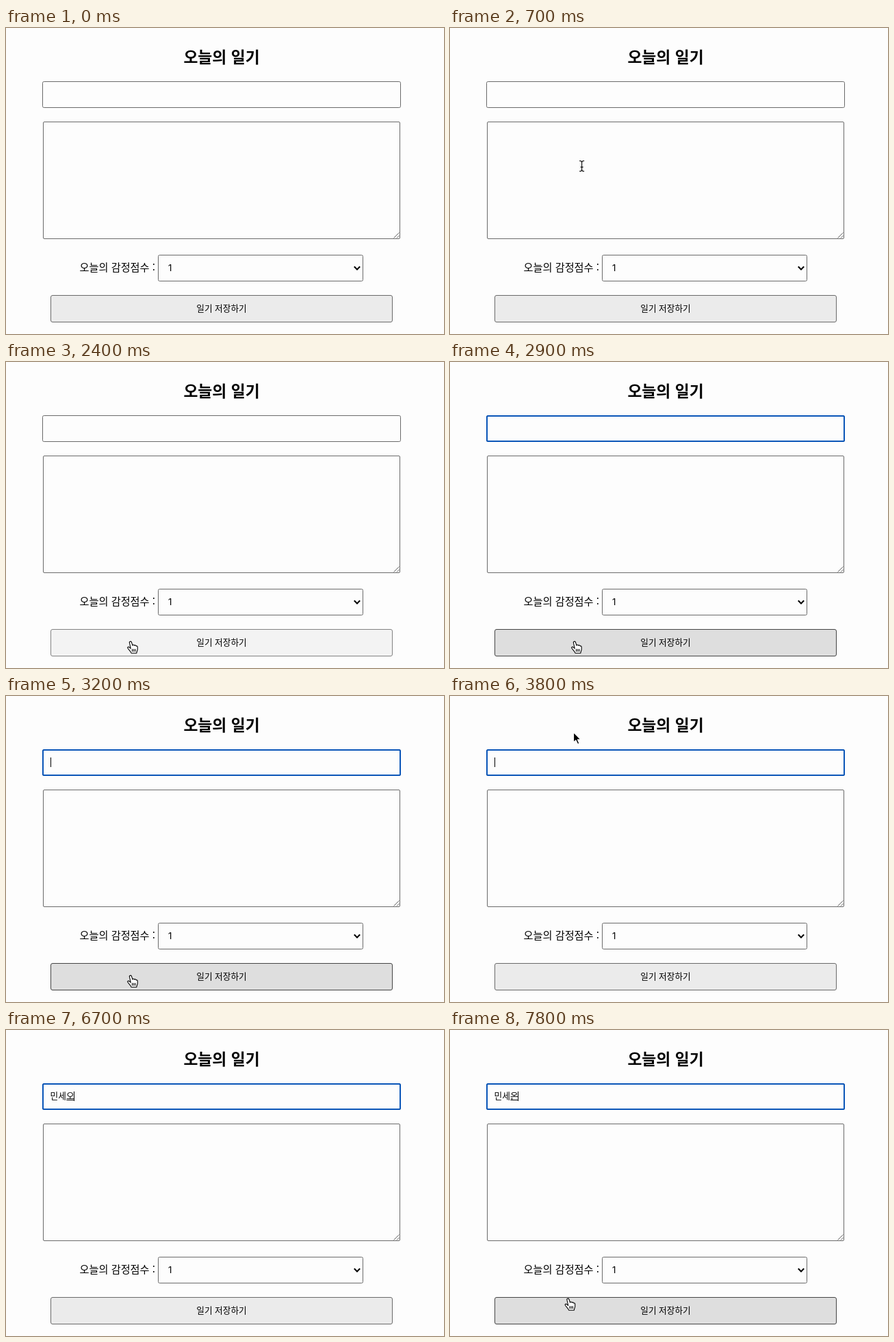
Recreate the animation shown at these times as an HTML page. Size 640 by 448 pixels, loop 8000 ms.

```html
<!DOCTYPE html>
<html lang="ko">
<head>
<meta charset="utf-8">
<title>오늘의 일기</title>
<style>
  html, body { margin: 0; width: 100%; height: 100%; overflow: hidden; background: #fdfdfd; }
  svg { display: block; }
  text { font-family: "Noto Sans CJK KR", "Noto Sans CJK", "Noto Sans", sans-serif; fill: #000; }
  .box { fill: #fdfdfd; stroke: #6a6a6a; }
  .small { font-size: 12.7px; }
</style>
</head>
<body>
<svg width="640" height="448" viewBox="0 0 640 448">
  <text x="315" y="51" font-size="22.8" font-weight="700" text-anchor="middle">오늘의 일기</text>

  <rect class="box" x="53.5" y="78.5" width="523" height="38" rx="2"/>
  <rect id="ring" x="54" y="79" width="522" height="37" rx="1.5" fill="none" stroke="#0a55b8" stroke-width="2"/>
  <text id="entry" class="small" x="64.6" y="100.6"></text>
  <rect id="underline" y="102" height="1"/>
  <rect id="caret" y="90" width="1" height="14"/>

  <rect class="box" x="54.5" y="137.5" width="521" height="171" rx="1.5"/>
  <path d="M566.5 307.5l8-8M571 307.5l3.5-3.5" stroke="#666" fill="none"/>

  <text x="107.5" y="356" font-size="15.2">오늘의 감정점수 :</text>
  <rect class="box" x="222.5" y="332.5" width="299" height="38" rx="2"/>
  <text x="237" y="356" font-size="13.3" style="font-family: Inter, sans-serif">1</text>
  <path d="M508.8 349.3l4.2 4.2 4.2-4.2" stroke="#000" stroke-width="2" fill="none"/>

  <rect id="button" x="65.5" y="391.5" width="499" height="39" rx="2.5"/>
  <text class="small" x="315" y="415" text-anchor="middle">일기 저장하기</text>

  <g id="pointer">
    <path id="arrow" d="M0 0V15L3.4 11.8 6 17.6 8.5 16.5 6 10.9H10.6Z" fill="#000" stroke="#fff" stroke-width="1.2" stroke-linejoin="round"/>
    <g id="beam" fill="none">
      <path d="M-3.5 -7.5Q0 -8 0 -5V5Q0 8 -3.5 7.5M3.5 -7.5Q0 -8 0 -5V5Q0 8 3.5 7.5M-2 1.5H2" stroke="#fff" stroke-width="2.4"/>
      <path d="M-3.5 -7.5Q0 -8 0 -5V5Q0 8 -3.5 7.5M3.5 -7.5Q0 -8 0 -5V5Q0 8 3.5 7.5M-2 1.5H2" stroke="#000" stroke-width="1.1"/>
    </g>
    <g id="hand" stroke="#000" stroke-width="1.1" stroke-linejoin="round" stroke-linecap="round">
      <path d="M-1.6 2C-2.2 .2 .6 -.7 1.4 1.2L3 6C3.4 4.6 5.4 4.8 5.7 6.2C6.4 5.2 8 5.6 8.2 6.9C9.2 6.4 10.2 7.1 10.2 8.5V11.5C10.2 13.5 9 14.5 8.8 17.3H1.2C.6 15.2 -2.6 12.6 -4.2 9.8C-4.8 8.2 -2.8 7.6 -1.6 8.8L.2 10.4Z" fill="#fff"/>
      <path d="M2.5 11.6V14.6M4.7 11.6V14.6M6.9 11.6V14.6" fill="none"/>
    </g>
  </g>
</svg>

<script>
const LOOP = 8000, STEP = 100;
const $ = id => document.getElementById(id);
const show = (el, on) => el.setAttribute('visibility', on ? 'visible' : 'hidden');

// time, x, y of the pointer's hot spot
const path = [
  [100, 188, -6], [300, 196, 150], [400, 196, 150], [1300, 183, 351],
  [1400, 182.5, 357], [1800, 182, 409], [3300, 182, 409], [3800, 180.5, 53],
  [4200, 177, 70], [4500, 158, 93], [7200, 158, 93], [7800, 172.5, 393]
];

// time, focused, caret shown, text, composing
const field = [
  [0, 0, 0, ''], [2500, 1, 1, ''], [2900, 1, 0, ''], [3000, 0, 0, ''],
  [3200, 1, 1, ''], [4800, 1, 0, ''],
  [5500, 1, 1, 'ㅁ'], [5600, 1, 1, '미'], [5800, 1, 1, '민'],
  [6000, 1, 1, '민ㅅ'], [6200, 1, 1, '민세'], [6500, 1, 1, '민셍'],
  [6700, 1, 1, '민세오'], [7300, 1, 1, '민세온']
];

const looks = {
  idle: ['#ebebeb', '#6a6a6a'],
  hover: ['#dedede', '#444'],
  active: ['#f3f3f3', '#828282']
};

const lastAt = (rows, t) => rows.filter(r => r[0] <= t).pop() || rows[0];
const between = (t, a, b) => t >= a && t < b;
const inside = (x, y, l, t, r, b) => x >= l && x < r && y >= t && y < b;

function pointAt(t) {
  const a = lastAt(path, t);
  const b = path[path.indexOf(a) + 1];
  if (!b || t < a[0]) return a.slice(1);
  const u = (t - a[0]) / (b[0] - a[0]);
  const e = u * u * (3 - 2 * u);
  return [a[1] + (b[1] - a[1]) * e, a[2] + (b[2] - a[2]) * e];
}

function drawField(t) {
  const [, focused, caretOn, text] = lastAt(field, t);
  const entry = $('entry');
  if (entry.textContent !== text) entry.textContent = text;
  const width = text ? entry.getComputedTextLength() : 0;
  const last = text ? width / text.length : 0;
  show($('ring'), focused);
  show($('caret'), caretOn);
  $('caret').setAttribute('x', Math.round(65 + width - (text ? 1 : 0)));
  show($('underline'), text);
  $('underline').setAttribute('x', 65 + width - last);
  $('underline').setAttribute('width', Math.max(0, last - 1));
}

function drawPointer(t) {
  const [x, y] = pointAt(t);
  const onButton = inside(x, y, 65, 391, 565, 431);
  const onText = inside(x, y, 53, 78, 577, 117) || inside(x, y, 54, 137, 576, 309) ||
    inside(x, y, 108, 338, 218, 362);
  const kind = onButton ? 'hand' : onText ? 'beam' : 'arrow';
  const visible = between(t, 100, 5500) || t >= 7300;

  $('pointer').setAttribute('transform', `translate(${x} ${y})`);
  for (const id of ['hand', 'beam', 'arrow']) show($(id), visible && id === kind);

  const pressed = between(t, 2400, 2500) || between(t, 3000, 3200);
  const [fill, stroke] = looks[pressed ? 'active' : onButton ? 'hover' : 'idle'];
  $('button').setAttribute('fill', fill);
  $('button').setAttribute('stroke', stroke);
}

const start = performance.now();
function frame() {
  const elapsed = performance.now() - start;
  const t = Math.floor((elapsed % LOOP) / STEP) * STEP;
  drawField(t);
  drawPointer(t);
  requestAnimationFrame(frame);
}
frame();
</script>
</body>
</html>
```
